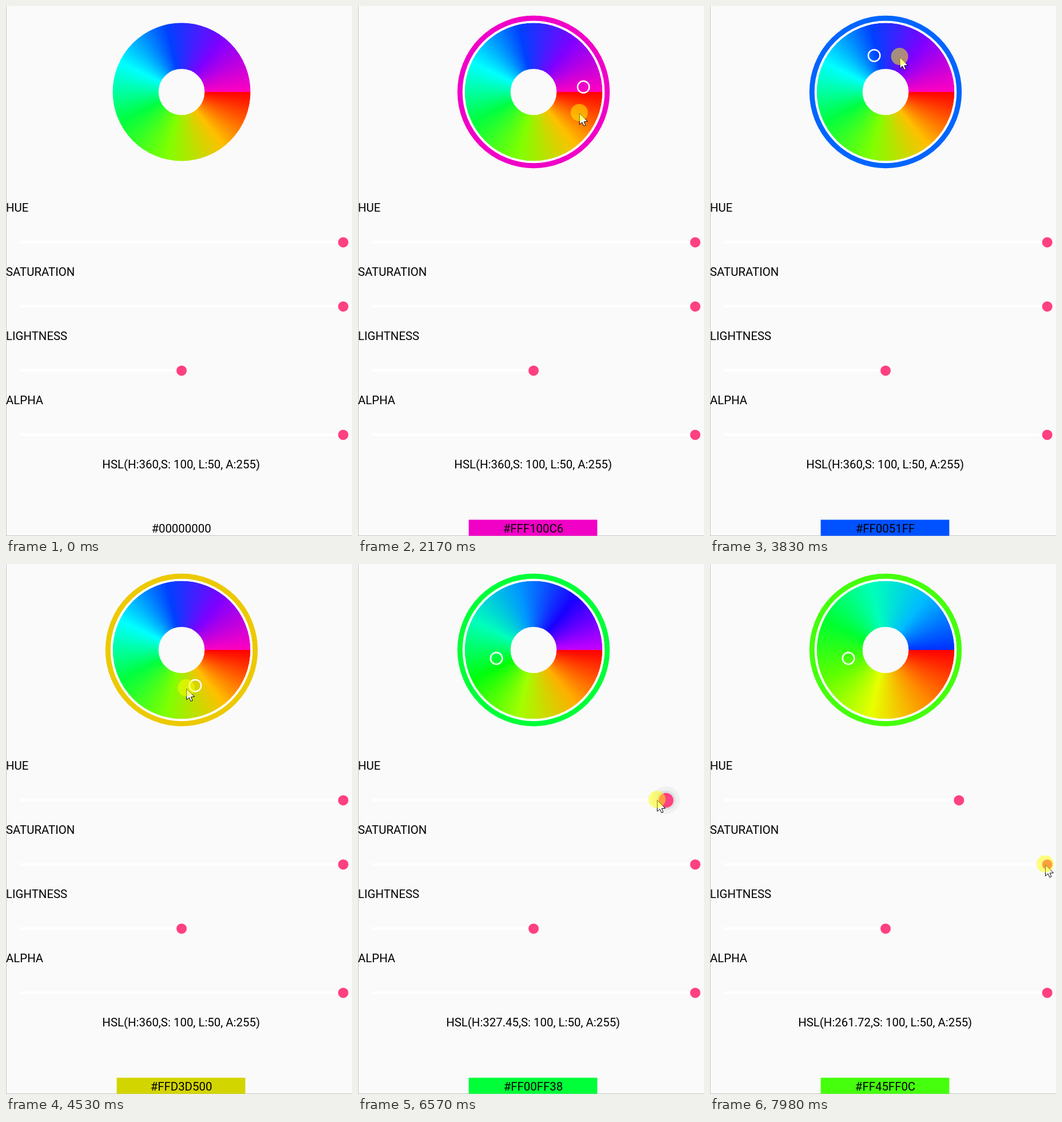
An HTML page with a canvas that plays this animation: 605x925 px, repeating every 8 s.

```html
<!DOCTYPE html>
<html lang="en">
<head>
<meta charset="utf-8">
<title>HSL color picker</title>
<style>
html, body { margin: 0; width: 100%; height: 100%; overflow: hidden; background: #fafafa; }
canvas { display: block; }
</style>
</head>
<body>
<canvas id="stage" width="605" height="925"></canvas>
<script>
const ctx = document.getElementById('stage').getContext('2d');
const LOOP = 8000, FIRST_STEP = 140, STEP = 78.4;
const CX = 307, CY = 150, TAU = Math.PI * 2;

// Steps at which the pointer changes what it does.
const HOVER = 8, PRESS_WHEEL = 22, RELEASE_WHEEL = 61, PRESS_HUE = 78, RELEASE_HUE = 90, PRESS_SATURATION = 100;

// [step, marker angle, pointer angle] while circling the wheel; the marker lags.
const spin = [[22, -10, -10], [26, -5.66, 24.2], [36, 132.07, 145.5], [47, 252.57, 291.6],
  [61, 526.99, 526.99], [80, 527.25, 527.25]];
const hueSlide = [[79, 360], [86, 284.04], [88, 261.72]];

const clamp = (v, lo, hi) => Math.max(lo, Math.min(hi, v));
const mix = (a, b, part) => a.map((v, k) => v + (b[k] - v) * clamp(part, 0, 1));

function at(keys, step) {
  const i = clamp(keys.findLastIndex(key => key[0] <= step), 0, keys.length - 2);
  const [start, ...a] = keys[i], [end, ...b] = keys[i + 1];
  return mix(a, b, (step - start) / (end - start));
}

// The drag spirals slowly inwards.
function onWheel(degrees, step) {
  const radius = clamp(87.6 - 1.33 * (step - 26), 66.6, 87.6);
  const a = degrees * TAU / 360;
  return [CX + radius * Math.cos(a), CY + radius * Math.sin(a)];
}

function pointerAt(step) {
  const hueGrab = [584, 412], hueDrop = [434, 409];
  if (step < HOVER) return mix([578, 900], [394, 68], step / HOVER);
  if (step < PRESS_WHEEL) {
    const part = (step - HOVER) / (PRESS_WHEEL - HOVER);
    return [445 - 51 * Math.cos(TAU * part), 68 + 67 * part];
  }
  if (step < RELEASE_WHEEL) return onWheel(at(spin, step)[1], step);
  if (step < PRESS_HUE) {
    const part = (step - RELEASE_WHEEL) / (PRESS_HUE - RELEASE_WHEEL);
    return mix([242, 165], hueGrab, 1 - (1 - part) ** 3.4);
  }
  if (step < RELEASE_HUE) return mix(hueGrab, hueDrop, (step - PRESS_HUE - 1) / 7.35);
  const part = clamp((step - RELEASE_HUE) / 8, 0, 1);
  const [x, y] = mix(hueDrop, [586, 523.5], part);
  return [x, y - 128 * Math.sin(Math.PI * part)];
}

// Pure hue to [r, g, b].
function hueColor(hue) {
  return [0, 8, 4].map(n => {
    const k = (n + hue / 30) % 12;
    return 255 * (0.5 - 0.5 * Math.max(-1, Math.min(k - 3, 9 - k, 1)));
  });
}

const wheelStop = (i, maxHue) => hueColor(i * maxHue / 8);
const css = rgb => `rgb(${rgb.map(Math.round)})`;

function wheelColor(degrees, maxHue) {
  const pos = (degrees + 360) % 360 / 360 * 7, i = Math.floor(pos);
  return mix(wheelStop(i, maxHue), wheelStop(i + 1, maxHue), pos - i);
}

function disc(x, y, r, fill) {
  ctx.fillStyle = fill;
  ctx.beginPath();
  ctx.arc(x, y, r, 0, TAU);
  ctx.fill();
}

function ring(x, y, inner, outer, stroke) {
  ctx.strokeStyle = stroke;
  ctx.lineWidth = outer - inner;
  ctx.beginPath();
  ctx.arc(x, y, (inner + outer) / 2, 0, TAU);
  ctx.stroke();
}

function rect(x, y, w, h, fill) {
  ctx.fillStyle = fill;
  ctx.fillRect(x, y, w, h);
}

function text(str, x, y, align = 'left') {
  ctx.fillStyle = '#000';
  ctx.textAlign = align;
  ctx.fillText(str, x, y);
}

function drawWheel(maxHue) {
  const gradient = ctx.createConicGradient(0, CX, CY);
  for (let i = 0; i < 8; i++) gradient.addColorStop(i / 7, css(wheelStop(i, maxHue)));
  ring(CX, CY, 40.3, 120.4, gradient);
}

function drawSlider(label, row, value, pressed) {
  const y = 412 + row * 112, x = 24.3 + 565.4 * value;
  text(label, 0, y - 53);
  rect(24, y - 2, x - 24, 4, '#fff');
  if (pressed) {
    disc(x, y, 24, '#f0f0f0');
    disc(x, y, 17, '#dfe1e2');
  }
  disc(x, y + 0.4, pressed ? 13 : 9, '#ff4081');
}

function drawPointer([x, y], pressed) {
  const arrow = [[0, 0], [0, 19.5], [4.5, 15.5], [7.5, 22], [10.5, 20.7], [7.7, 14.5], [14, 14]];
  ctx.beginPath();
  arrow.forEach(([dx, dy]) => ctx.lineTo(x + 0.5 + dx, y + 1.5 + dy));
  ctx.closePath();
  ctx.fillStyle = '#fff';
  ctx.fill();
  ctx.strokeStyle = '#000';
  ctx.lineWidth = 1;
  ctx.stroke();
  if (pressed) disc(x, y, 15, 'rgba(255,255,0,.5)');
}

function draw(time) {
  const step = Math.floor((time - FIRST_STEP) / STEP + 0.2);
  const [maxHue] = at(hueSlide, step);
  const onHue = step >= PRESS_HUE && step < RELEASE_HUE;
  const picked = step >= PRESS_WHEEL;
  let hex = '#00000000';

  ctx.font = '20.4px Roboto, sans-serif';
  rect(0, 0, 605, 925, '#fafafa');
  rect(0, 0, 1, 925, '#c4c4c4');
  rect(0, 924, 605, 1, '#c4c4c4');
  drawWheel(maxHue);

  if (picked) {
    const [angle] = at(spin, step);
    const color = wheelColor(angle, maxHue);
    ring(CX, CY, 120.4, 124.5, '#fff');
    // The outer ring trails the swatch slightly.
    ring(CX, CY, 124.3, 133.2, css(wheelColor(at(spin, step - 0.5)[0], maxHue)));
    ring(...onWheel(angle, step), 9, 11.5, '#fff');
    rect(193.6, 896.6, 224.8, 28, css(color));
    hex = '#FF' + color.map(v => Math.round(v).toString(16).padStart(2, '0')).join('').toUpperCase();
  }

  drawSlider('HUE', 0, maxHue / 360, onHue && step > PRESS_HUE + 2);
  drawSlider('SATURATION', 1, 1);
  drawSlider('LIGHTNESS', 2, 0.5);
  drawSlider('ALPHA', 3, 1);
  text(`HSL(H:${+maxHue.toFixed(2)},S: 100, L:50, A:255)`, 306.2, 807, 'center');
  text(hex, 306.5, 919, 'center');

  const pressed = (picked && step < RELEASE_WHEEL) || onHue || step >= PRESS_SATURATION;
  if (step >= 0) drawPointer(pointerAt(step), pressed);
}

const start = performance.now();
function tick() {
  draw((performance.now() - start) % LOOP);
  requestAnimationFrame(tick);
}
tick();
</script>
</body>
</html>
```
